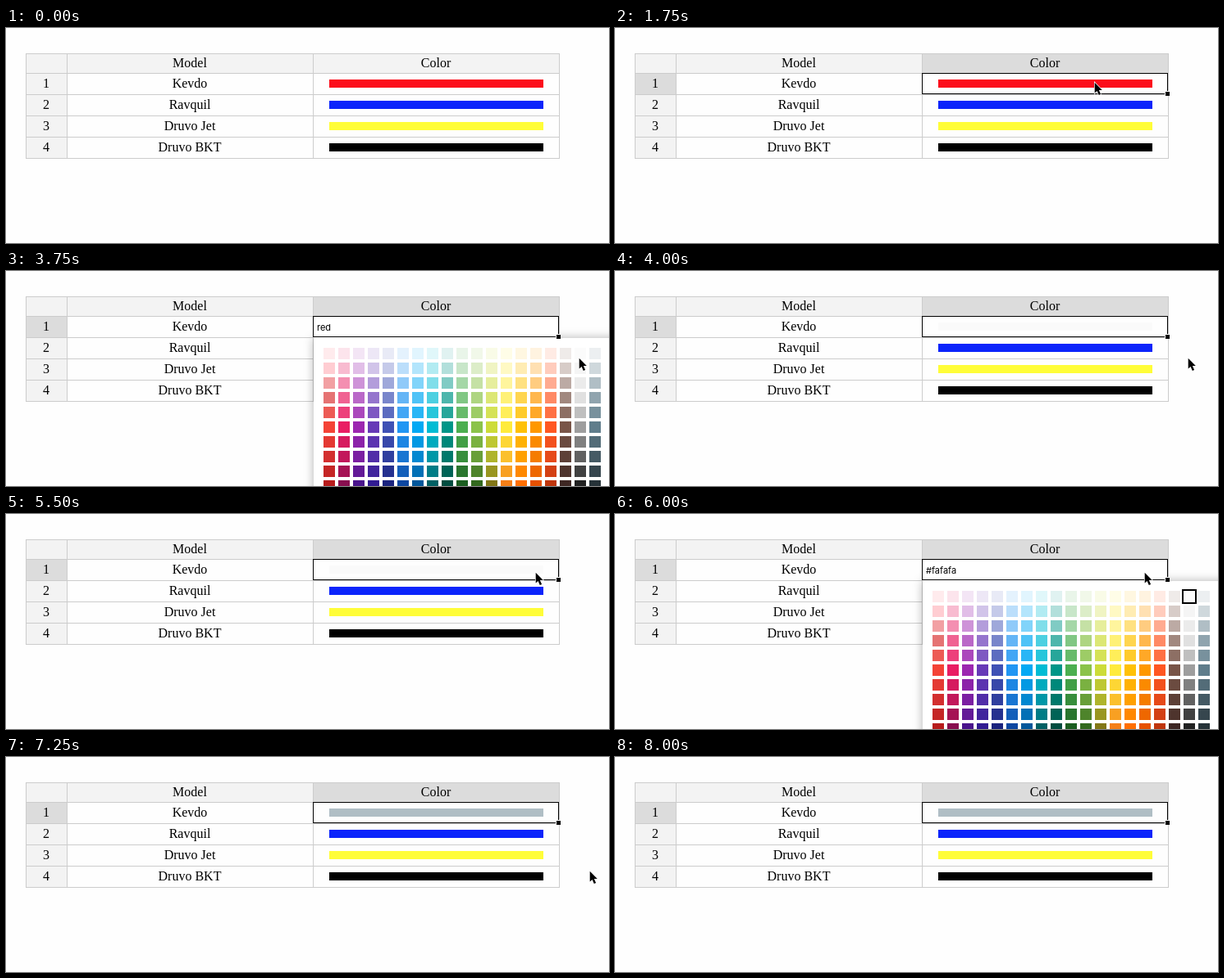
Animation, 735 px wide and 263 px high, one loop 8.75 s. Source, as an HTML page:

```html
<!DOCTYPE html>
<html>
<head>
<meta charset="utf-8">
<style>
  html, body { margin: 0; width: 100%; height: 100%; overflow: hidden; background: #fefefe; }
  svg { display: block; }
  .cell { font: 16px "Liberation Serif", Times, serif; text-anchor: middle; }
  #value { font: 11px Inter, sans-serif; }
  #sheet { filter: drop-shadow(0 0 6px rgba(0, 0, 0, .3)); }
</style>
</head>
<body>
<svg width="735" height="263" viewBox="0 0 735 263">
  <g id="table"></g>
  <g id="picker">
    <rect id="sheet" x="375" y="82" width="400" height="300" fill="#fff"/>
    <g id="swatches"></g>
    <rect id="chosen" x="692" y="93" width="16" height="16" fill="none" stroke="#000" stroke-width="2"/>
    <rect x="375" y="56" width="299" height="26" fill="#fff"/>
    <text id="value" x="379" y="73"></text>
  </g>
  <g id="selection">
    <rect x="374.5" y="55.5" width="299" height="25" fill="none" stroke="#000"/>
    <rect x="670" y="77" width="6" height="6" fill="#fff"/>
    <rect x="671" y="78" width="5" height="5"/>
  </g>
  <path id="cursor" d="M.7 .8V13.6L3.6 10.9 5.8 16.1 8.1 15.1 5.9 10H9.8Z" stroke="#fff" stroke-width="1.4" paint-order="stroke"/>
</svg>
<script>
const LOOP = 8750;
const $ = id => document.getElementById(id);
const rect = (x, y, w, h, fill, id = '') =>
  `<rect x="${x}" y="${y}" width="${w}" height="${h}" fill="${fill}" ${id && `id="${id}"`}/>`;
const label = (x, y, text) => `<text class="cell" x="${x}" y="${y}">${text}</text>`;

// Table
const rows = [
  ['Kevdo', '#fc0d1b'], ['Ravquil', '#0b24fb'],
  ['Druvo Jet', '#fffd38'], ['Druvo BKT', '#000'],
];
const rowTop = i => 55 + 26 * i;
let table = rect(25, 32, 649, 24, '#f3f3f3') + rect(25, 56, 49, 103, '#f3f3f3')
  + rect(375, 32, 299, 23, '#dcdcdc', 'columnMark') + rect(25, 56, 49, 25, '#dcdcdc', 'rowMark');
for (const x of [24, 74, 374, 674]) table += rect(x, 31, 1, 129, '#ccc');
for (const y of [31, ...[0, 1, 2, 3, 4].map(rowTop)]) table += rect(24, y, 651, 1, '#ccc');
table += label(224, 48, 'Model') + label(524, 48, 'Color');
rows.forEach(([name, color], i) => {
  const y = rowTop(i);
  table += label(49, y + 18, i + 1) + label(224, y + 18, name) + rect(394, y + 8, 261, 10, color, 'bar' + i);
});
$('table').innerHTML = table;

// Material palette: shades 100, 300, 500, 700 and 900 per hue, the others are blended
const hues = `ffcdd2 e57373 f44336 d32f2f b71c1c
f8bbd0 f06292 e91e63 c2185b 880e4f
e1bee7 ba68c8 9c27b0 7b1fa2 4a148c
d1c4e9 9575cd 673ab7 512da8 311b92
c5cae9 7986cb 3f51b5 303f9f 1a237e
bbdefb 64b5f6 2196f3 1976d2 0d47a1
b3e5fc 4fc3f7 03a9f4 0288d1 01579b
b2ebf2 4dd0e1 00bcd4 0097a7 006064
b2dfdb 4db6ac 009688 00796b 004d40
c8e6c9 81c784 4caf50 388e3c 1b5e20
dcedc8 aed581 8bc34a 689f38 33691e
f0f4c3 dce775 cddc39 afb42b 827717
fff9c4 fff176 ffeb3b fbc02d f57f17
ffecb3 ffd54f ffc107 ffa000 ff6f00
ffe0b2 ffb74d ff9800 f57c00 e65100
ffccbc ff8a65 ff5722 e64a19 bf360c
d7ccc8 a1887f 795548 5d4037 3e2723
f5f5f5 e0e0e0 9e9e9e 616161 212121
cfd8dc 90a4ae 607d8b 455a64 263238`.split('\n').map(line => line.split(' '));
const channels = hex => [0, 2, 4].map(i => parseInt(hex.substr(i, 2), 16));
const mix = (a, b, k) => {
  const end = channels(b);
  return `rgb(${channels(a).map((v, i) => Math.round(v + (end[i] - v) * k))})`;
};
const shade = (keys, row) => {
  if (row === 0) return mix('ffffff', keys[0], .4);
  const i = row - 1 >> 1;
  return row % 2 ? '#' + keys[i] : mix(keys[i], keys[i + 1], .5);
};
let swatches = '';
hues.forEach((keys, col) => {
  for (let row = 0; row < 10; row++)
    swatches += rect(387 + 18 * col, 94 + 18 * row, 14, 14, shade(keys, row));
});
$('swatches').innerHTML = swatches;

// Pointer stops: time, x, y; the pointer jumps from one to the next
const stops = [
  [250, 674, 13], [500, 624, 22], [750, 583, 67], [1000, 584, 66],
  [3000, 588, 68], [3250, 702, 126], [3500, 688, 109], [3750, 698, 106],
  [4750, 655, 72], [5000, 654, 71], [5500, 645, 71],
  [6250, 709, 107], [6500, 717, 112], [6750, 713, 126], [7000, 711, 139],
  [7750, 722, 122],
];
const show = (id, on) => $(id).setAttribute('visibility', on ? 'visible' : 'hidden');

function draw(t) {
  const selected = t >= 1750;
  const firstEdit = t >= 2750 && t < 4000;
  const secondEdit = t >= 6000 && t < 7250;
  for (const id of ['selection', 'columnMark', 'rowMark']) show(id, selected);
  show('picker', firstEdit || secondEdit);
  show('chosen', secondEdit);
  $('value').textContent = firstEdit ? 'red' : '#fafafa';
  $('bar0').setAttribute('fill', t < 4000 ? rows[0][1] : t < 7250 ? '#fafafa' : '#b0bec5');

  const stop = stops.filter(s => s[0] <= t).pop();
  show('cursor', stop && t < 8000);
  if (stop) $('cursor').setAttribute('transform', `translate(${stop[1]} ${stop[2]})`);
}

function tick() {
  draw(performance.now() % LOOP);
  requestAnimationFrame(tick);
}
tick();
</script>
</body>
</html>
```
